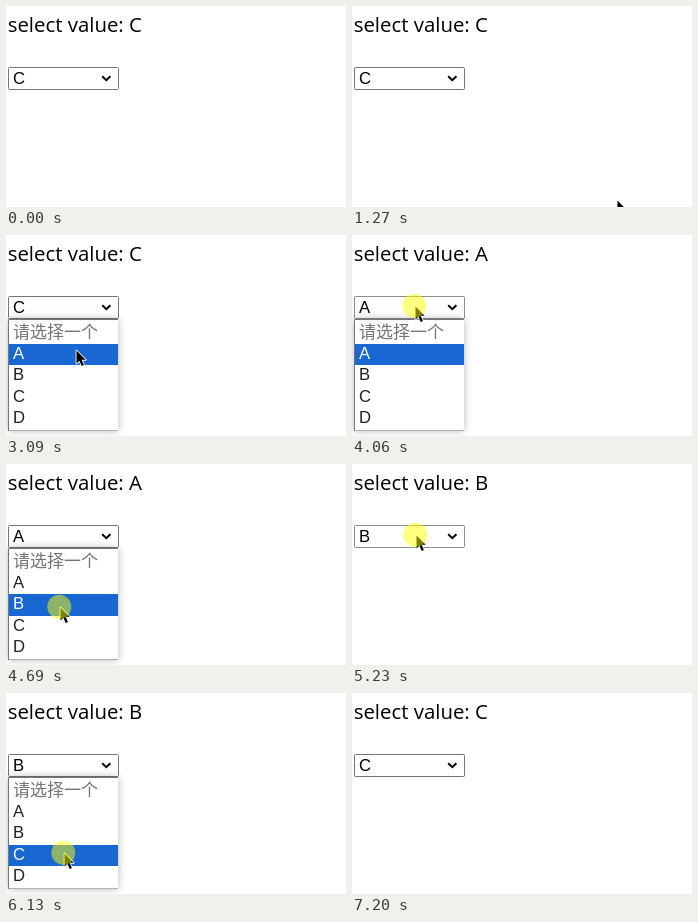
Recreate the animation shown at these times as an HTML page with a canvas. Size 340 px wide and 201 px high, loop 7.39 s.

```html
<!DOCTYPE html>
<html lang="zh">
<head>
<meta charset="utf-8">
<title>Select value</title>
<style>
  html, body { margin: 0; width: 340px; height: 201px; overflow: hidden; background: #fff; }
  canvas { display: block; width: 340px; height: 201px; }
</style>
</head>
<body>
<canvas id="stage"></canvas>
<script>
const W = 340, H = 201, LOOP = 7390;
const canvas = document.getElementById('stage');
const ctx = canvas.getContext('2d');
const dpr = window.devicePixelRatio || 1;
canvas.width = Math.round(W * dpr);
canvas.height = Math.round(H * dpr);

const TITLE_FONT = '20.4px "Open Sans", "Noto Sans", sans-serif';
const FIELD_FONT = '16.67px "Liberation Sans", Arial, sans-serif';
const HINT_FONT = '17px "Noto Sans CJK SC", "Noto Sans CJK", sans-serif';
const OPTIONS = ['请选择一个', 'A', 'B', 'C', 'D'];
const FIRST = 'C', FIELD_Y = 71, PRESS_TIME = 110;
const rowTop = i => Math.round(87.5 + i * 21.4);

// Each round: press the field, list opens, hover a row, pick it, list closes
const ROUNDS = [
  { fieldX: 98, press: 2220, open: 2340, over: 3090, pick: 3570, close: 3700, x: 70, y: 115, value: 'A' },
  { fieldX: 63, press: 3990, open: 4040, over: 4400, pick: 4570, close: 4800, x: 54, y: 143, value: 'B' },
  { fieldX: 64, press: 5230, open: 5360, over: 5700, pick: 6110, close: 6230, x: 58, y: 160, value: 'C' }
];

// Pointer stops: a short visit, the rounds, then the way out
const stop = (t, x, y) => ({ t, x, y });
const STOPS = [
  stop(89, 243, 204), stop(90, 243, 197), stop(430, 117, 94), stop(800, 212, 204),
  stop(1269, 265, 204), stop(1270, 265, 194),
  ...ROUNDS.flatMap(r => [
    stop(r.press - 150, r.fieldX, FIELD_Y),
    stop(r.open + 60, r.fieldX, FIELD_Y),
    stop(r.open + 340, r.x, r.y),
    stop(r.close + 20, r.x, r.y)
  ]),
  stop(6470, 266, 204)
];

function pointer(t) {
  const i = STOPS.findIndex(s => s.t > t);
  if (i < 0) return STOPS[STOPS.length - 1];
  const b = STOPS[i], a = STOPS[i - 1] || b;
  const k = a === b ? 0 : (t - a.t) / (b.t - a.t);
  const e = k * k * (3 - 2 * k);
  return { x: a.x + (b.x - a.x) * e, y: a.y + (b.y - a.y) * e };
}

function label(text, x, y, font, color) {
  ctx.font = font;
  ctx.fillStyle = color;
  ctx.fillText(text, x, y);
}

function trace(...points) {
  ctx.beginPath();
  points.forEach(p => ctx.lineTo(...p));
}

function drawField(value, border) {
  ctx.strokeStyle = border;
  ctx.lineWidth = 1;
  ctx.beginPath();
  ctx.roundRect(2.5, 61.5, 110, 22, 1);
  ctx.stroke();
  label(value, 7, 78, FIELD_FONT, '#000');
  ctx.strokeStyle = '#000';
  ctx.lineWidth = 2;
  trace([96.2, 70.2], [100.3, 74.2], [104.4, 70.2]);
  ctx.stroke();
}

function drawList(active) {
  ctx.save();
  ctx.shadowColor = 'rgba(0,0,0,0.28)';
  ctx.shadowBlur = 8 * dpr;
  ctx.fillStyle = '#fff';
  ctx.fillRect(2, 84, 110, 112);
  ctx.restore();
  ctx.lineWidth = 1;
  ctx.strokeStyle = '#b0b0b0';
  trace([2, 195.5], [112, 195.5]);
  ctx.stroke();
  ctx.strokeStyle = '#767676';
  trace([2.5, 196], [2.5, 84.5], [112, 84.5]);
  ctx.stroke();
  OPTIONS.forEach((text, i) => {
    const top = rowTop(i);
    if (i === active) {
      ctx.fillStyle = '#1967d2';
      ctx.fillRect(3, top, 109, rowTop(i + 1) - top);
    }
    const color = i === active ? '#fff' : i ? '#222' : '#757575';
    label(text, 7, top + 15, i ? FIELD_FONT : HINT_FONT, color);
  });
}

function drawPointer({ x, y }) {
  ctx.save();
  ctx.translate(x + 0.5, y + 0.5);
  ctx.scale(0.86, 0.86);
  trace([0, 0], [0, 15], [3.4, 11.8], [6, 18], [8.6, 16.9], [6, 10.9], [10.7, 10.9]);
  ctx.closePath();
  ctx.lineJoin = 'round';
  ctx.strokeStyle = '#fff';
  ctx.lineWidth = 2;
  ctx.stroke();
  ctx.fillStyle = '#000';
  ctx.fill();
  ctx.restore();
}

function drawPress({ x, y }) {
  ctx.fillStyle = 'rgba(255,255,0,0.5)';
  ctx.beginPath();
  ctx.arc(x - 0.7, y - 0.3, 12, 0, Math.PI * 2);
  ctx.fill();
}

function draw(t) {
  const within = (from, to) => t >= from && t < to;
  const value = ROUNDS.reduce((v, r) => t >= r.close ? r.value : v, FIRST);
  const opened = ROUNDS.find(r => within(r.open, r.close));
  const pressed = ROUNDS.some(r => within(r.press, r.press + PRESS_TIME));
  const picked = ROUNDS.some(r => within(r.pick, r.close));
  const tip = pointer(t);
  const hover = tip.x < 113 && tip.y > 61 && tip.y < 84;

  ctx.setTransform(dpr, 0, 0, dpr, 0, 0);
  ctx.fillStyle = '#fff';
  ctx.fillRect(0, 0, W, H);
  label('select value: ' + value, 1.7, 26, TITLE_FONT, '#000');
  drawField(value, pressed ? '#8d8d8d' : hover ? '#4f4f4f' : '#767676');
  if (opened) drawList(OPTIONS.indexOf(t < opened.over ? value : opened.value));
  drawPointer(tip);
  if (pressed || picked) drawPress(tip);
}

const start = performance.now();
function frame() {
  draw((performance.now() - start) % LOOP);
  requestAnimationFrame(frame);
}
frame();
</script>
</body>
</html>
```
